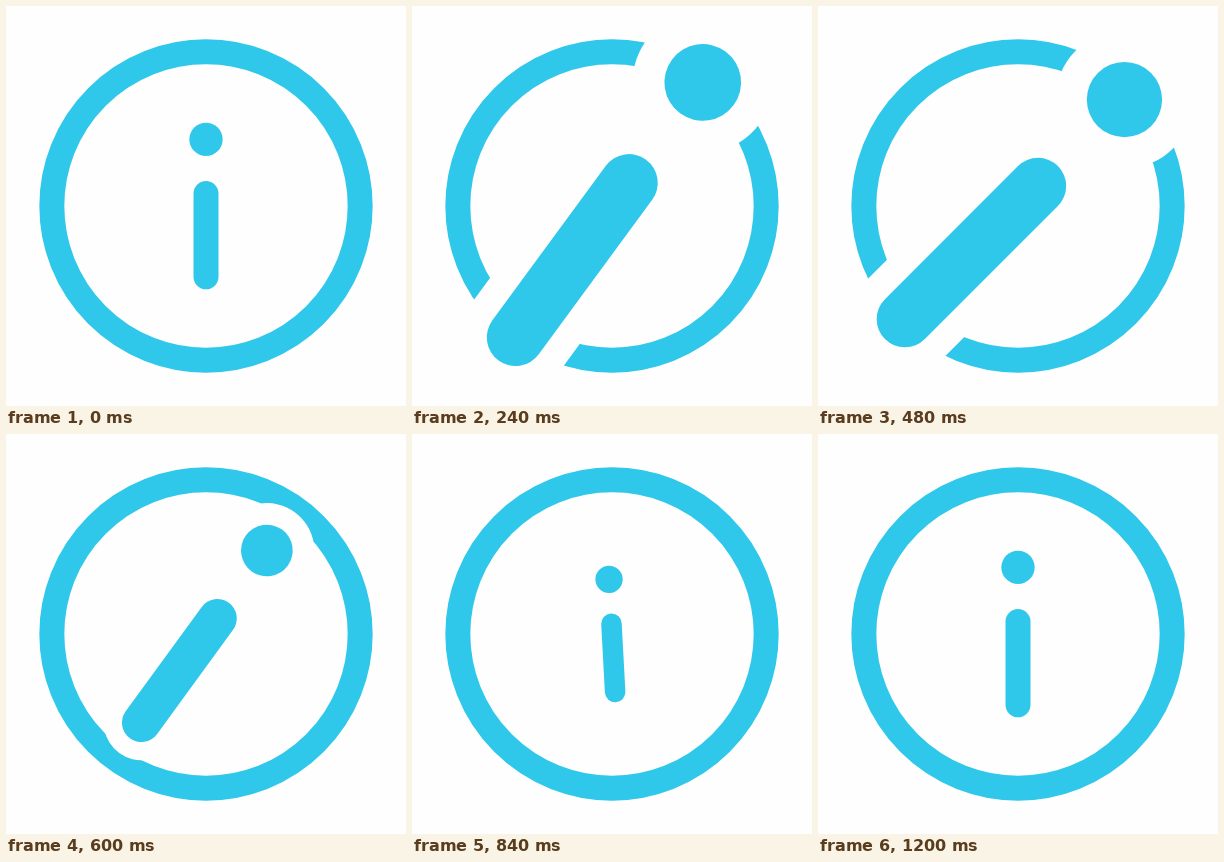
These frames come from a looping animation (400 px wide and 400 px high, 3.23 s). An HTML page with a canvas:

```html
<!DOCTYPE html>
<html lang="en">
<head>
<meta charset="utf-8">
<title>Info icon</title>
<style>
  html, body { margin: 0; width: 100%; height: 100%; overflow: hidden; background: #fefefe; }
  canvas { display: block; width: 100vmin; height: 100vmin; margin: 0 auto; }
</style>
</head>
<body>
<canvas id="stage" width="400" height="400"></canvas>
<script>
const ctx = document.getElementById('stage').getContext('2d');
const BLUE = '#30c8ea';
const PAPER = '#fefefe';
const LOOP = 3230;
const STEP = 30;

// [time in ms, value], eased in and out between keys
const SCALE = [[0, 1], [240, 2.3], [450, 2.3], [750, 0.8], [1200, 1]];
const ANGLE = [[0, 0], [360, 49], [480, 45], [960, -12], [1200, 0]];

function valueAt(keys, t) {
  const i = keys.findIndex(([time]) => time > t);
  if (i < 0) return keys[keys.length - 1][1];
  const [t0, a] = keys[i - 1];
  const [t1, b] = keys[i];
  const x = (t - t0) / (t1 - t0);
  return a + (b - a) * x * x * (3 - 2 * x);
}

function dot(radius, color) {
  ctx.fillStyle = color;
  ctx.beginPath();
  ctx.arc(0, -66.67, radius, 0, Math.PI * 2);
  ctx.fill();
}

function bar(width, color) {
  ctx.strokeStyle = color;
  ctx.lineWidth = width;
  ctx.lineCap = 'round';
  ctx.beginPath();
  ctx.moveTo(0, -12.5);
  ctx.lineTo(0, 70.83);
  ctx.stroke();
}

function ring() {
  ctx.strokeStyle = BLUE;
  ctx.lineWidth = 25;
  ctx.beginPath();
  ctx.arc(0, 0, 154.17, 0, Math.PI * 2);
  ctx.stroke();
}

function draw(t) {
  ctx.fillStyle = PAPER;
  ctx.fillRect(0, 0, 400, 400);
  ctx.save();
  ctx.translate(200, 200);
  ring();
  ctx.rotate(valueAt(ANGLE, t) * Math.PI / 180);
  const s = valueAt(SCALE, t);
  ctx.scale(s, s);
  // Paper-coloured halos cut the ring
  dot(30.56, PAPER);
  bar(48.4, PAPER);
  dot(16.67, BLUE);
  bar(25, BLUE);
  ctx.restore();
}

const start = performance.now();
function tick() {
  const t = (performance.now() - start) % LOOP;
  draw(Math.floor((t + 4) / STEP) * STEP);
  requestAnimationFrame(tick);
}
tick();
</script>
</body>
</html>
```
